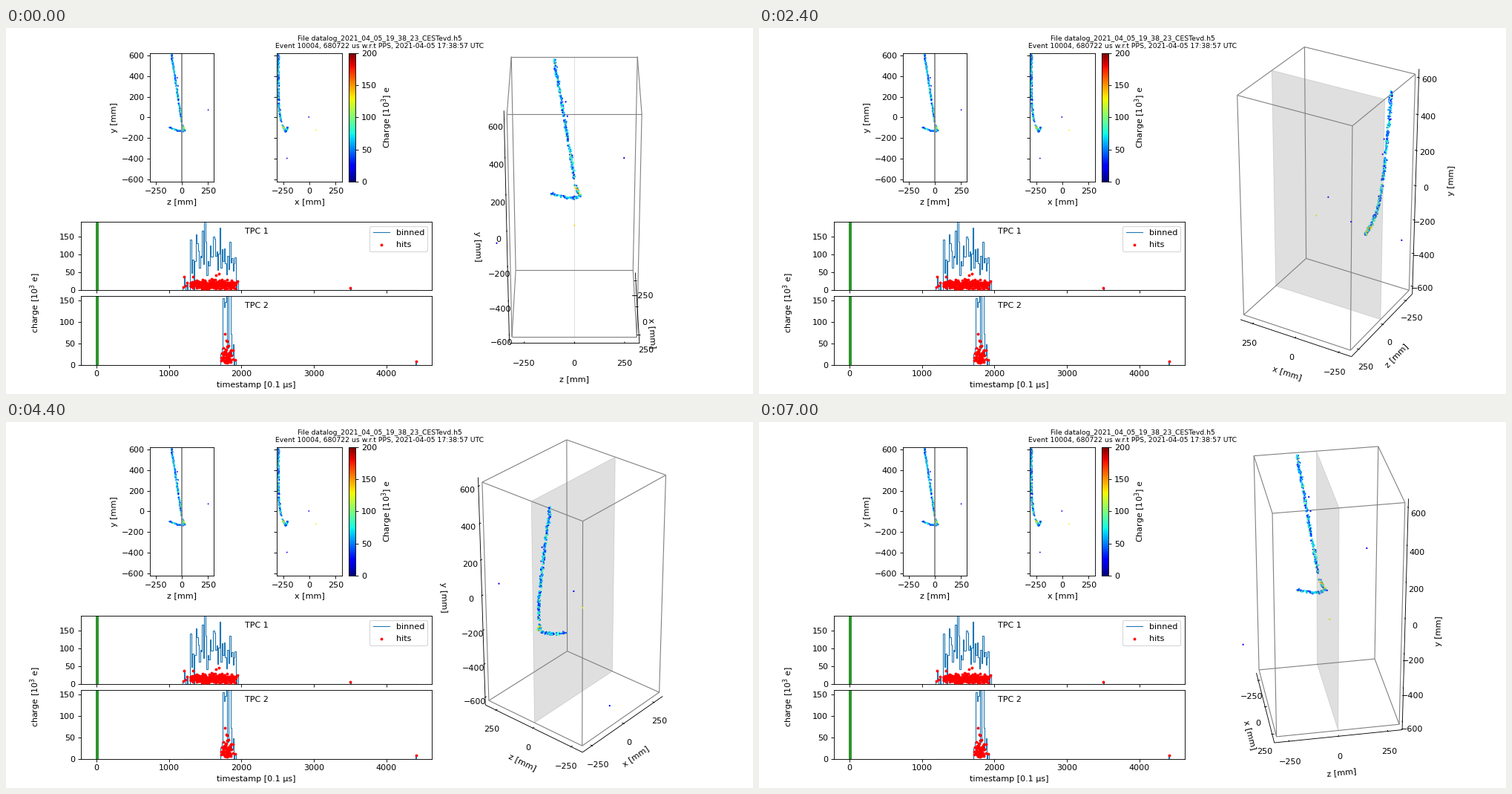
A matplotlib script that plays this animation: 1007 px wide and 493 px high, repeating every 7.2 s.

```python
from itertools import combinations, product

import matplotlib.pyplot as plt
import numpy as np
from matplotlib.animation import FuncAnimation
from matplotlib.collections import LineCollection
from matplotlib.patches import Polygon

W, H, DPI = 1007, 493, 80
FRAMES, INTERVAL = 36, 200
plt.rcParams.update({"font.family": "DejaVu Sans", "font.size": 10})

# Detector volume in mm, ordered (x, z, y) with y pointing up
SPAN = np.array([310.38, 310.38, 620.76])
UNIT = 0.3734 / SPAN[0]
CENTER, SCALE, DIST = (766.2, 228.4), 2265, 10
ELEV = np.radians(30)
CMAP = plt.get_cmap("jet")

rng = np.random.default_rng(7)
fig = plt.figure(figsize=(W / DPI, H / DPI), dpi=DPI, facecolor="white")


def pixel_axes(left, top, right, bottom):
    return fig.add_axes([left / W, 1 - bottom / H, (right - left) / W, (bottom - top) / H])


# ---------------------------------------------------------------- event data
def trail(count, start, end, bend=lambda s: (0, 0, 0)):
    """Jittered hits along a bent line between two (x, z, y) points."""
    points = np.array([(1 - s) * np.array(start) + s * np.array(end) + bend(s)
                       for s in rng.uniform(0, 1, count)])
    return points + rng.normal(0, 3.5, points.shape)


def charges(count, width):
    return 20 + width * rng.beta(1.4, 1.8, count)


track = trail(310, (-294, -99, 616), (-294, 0, -46), lambda s: (28 * s**6, 0, 0))
kink = trail(40, (-260, 3, -72), (-232, 29, -126))
branch = trail(75, (-232, 29, -124), (-207, -117, -97),
               lambda s: (0, 0, -15 * np.sin(np.pi * s**0.7)))
strays = [(-275, 252, 73), (-5, 0, 4), (-213, -402, -395),
          (64, 0, -122), (-288, -43, 384), (-286, -35, 305)]
hits = np.vstack([track, kink, branch, strays])
charge = np.concatenate([charges(len(track), 90), charges(len(kink), 160),
                         charges(len(branch), 90), [20, 25, 22, 132, 20, 22]])
colors = CMAP(charge / 200)

# ---------------------------------------------------------------- projections
fig.suptitle("File datalog_2021_04_05_19_38_23_CESTevd.h5\n"
             "Event 10004, 680722 us w.r.t PPS, 2021-04-05 17:38:57 UTC", fontsize="small")

ax_zy = pixel_axes(194, 34, 280, 207)
ax_xy = pixel_axes(365, 34, 453, 207)
for ax, column, limit, name in ((ax_zy, 1, 304.3, "z"), (ax_xy, 0, 310.4, "x")):
    ax.scatter(hits[:, column], hits[:, 2], s=2.6, c=colors, lw=0)
    ax.set(xlim=(-limit, limit), ylim=(-SPAN[2], SPAN[2]), xticks=(-250, 0, 250),
           yticks=range(-600, 601, 200), xlabel=f"{name} [mm]")
ax_zy.axvline(0, color="gray", lw=1.5)
ax_zy.set_ylabel("y [mm]")
ax_xy.tick_params(labelleft=False)

ax_bar = pixel_axes(462, 34, 471, 207)
ax_bar.imshow(np.linspace(0, 1, 256)[:, None], cmap=CMAP, origin="lower",
              aspect="auto", extent=(0, 1, 0, 200))
ax_bar.set(xticks=[], yticks=range(0, 201, 50))
ax_bar.yaxis.tick_right()
ax_bar.yaxis.set_label_position("right")
ax_bar.set_ylabel("Charge [$10^3$] e")

# ---------------------------------------------------------------- waveforms
pulses1 = np.column_stack([1295 + 650 * rng.beta(1.15, 1.15, 260),
                           rng.normal(16, 6, 260).clip(4, 31)])
outliers1 = [(1205, 37), (1200, 9), (1230, 13), (1250, 21), (1330, 38), (1648, 42), (1690, 46), (3500, 6)]
pulses2 = np.column_stack([rng.normal(1805, 42, 60).clip(1722, 1890),
                           4 + 40 * rng.beta(1.1, 1.8, 60)])
outliers2 = [(1770, 72), (1795, 57), (1800, 54), (1915, 12), (4410, 8)]

ax_t1 = pixel_axes(101, 261, 574, 353)
ax_t2 = pixel_axes(101, 361, 574, 453.7)
for ax, title, top, pulses in ((ax_t1, "TPC 1", 193, np.vstack([pulses1, outliers1])),
                               (ax_t2, "TPC 2", 159.5, np.vstack([pulses2, outliers2]))):
    time, size = pulses.T
    binned, edges = np.histogram(time, np.arange(1190, 4450, 15), weights=size)
    steps = ax.stairs(binned, edges, color="C0", lw=1)
    dots = ax.scatter(time, size, s=12, c="red", lw=0, zorder=3)
    ax.axvspan(-12, 30, color="#2e942e", lw=0)
    ax.set(xlim=(-213, 4628), ylim=(0, top), xticks=range(0, 4001, 1000), yticks=range(0, 151, 50))
    ax.text(0.5, 0.86, title, transform=ax.transAxes, ha="center", va="center")
    if ax is ax_t1:
        ax.legend([steps, dots], ["binned", "hits"], loc="upper right")
ax_t1.tick_params(labelbottom=False)
ax_t2.set_xlabel("timestamp [0.1 \u03bcs]")
fig.text(39.5 / W, 1 - 370 / H, "charge [$10^3$ e]", rotation=90, ha="center", va="center")

# ---------------------------------------------------------------- 3D view
view = fig.add_axes([0, 0, 1, 1])
view.set(xlim=(0, W), ylim=(H, 0))
view.axis("off")

CORNERS = np.array(list(product((-1, 1), repeat=3))) * SPAN
EDGES = [pair for pair in combinations(range(8), 2)
         if np.count_nonzero(CORNERS[pair[0]] != CORNERS[pair[1]]) == 1]
CATHODE = np.array([(-1, 0, -1), (1, 0, -1), (1, 0, 1), (-1, 0, 1)]) * SPAN

# (axis index, tick direction, side that flips to the near edge, name, ticks, name gap)
AXES = ((0, 1, 1, "x", range(-250, 251, 250), 1.59),
        (1, 0, 0, "z", range(-250, 251, 250), 1.59),
        (2, 0, 0, "y", range(-600, 601, 200), 2.6))
OFFSET = SPAN / 6
TICK_GAP = 0.73

box = view.add_collection(LineCollection([], colors="gray", lw=1))
axis_lines = view.add_collection(LineCollection([], colors="black", lw=0.8))
cathode = view.add_patch(Polygon(np.zeros((4, 2)), facecolor=(0.5, 0.5, 0.5, 0.25),
                                 edgecolor=(0.5, 0.5, 0.5, 0.25), lw=0.8, zorder=4))
cloud = view.scatter(np.zeros(len(hits)), np.zeros(len(hits)), s=4, lw=0)
tick_texts = [[view.text(0, 0, str(v).replace("-", "\u2212"), ha="center", va="top")
               for v in axis[4]] for axis in AXES]
name_texts = [view.text(0, 0, f"{axis[3]} [mm]", ha="center", va="center",
                        rotation_mode="anchor") for axis in AXES]


def project(points, azim):
    """Screen positions and distances to the camera."""
    x, z, y = np.moveaxis(np.asarray(points, float) * UNIT, -1, 0)
    toward = x * np.cos(azim) + z * np.sin(azim)
    right = z * np.cos(azim) - x * np.sin(azim)
    up = y * np.cos(ELEV) - toward * np.sin(ELEV)
    depth = DIST - toward * np.cos(ELEV) - y * np.sin(ELEV)
    screen = np.stack([CENTER[0] + SCALE * right / depth, CENTER[1] - SCALE * up / depth], -1)
    return screen, depth


def pushed_out(point, index, gap):
    moved = point + np.sign(point) * gap * OFFSET
    moved[index] = point[index]
    return moved


def draw_axes(azim):
    direction = np.array([np.cos(azim), np.sin(azim), np.tan(ELEV)])
    far = np.where(direction < -1e-9, 1, -1)
    segments = []
    for (index, tickdir, flip, _, ticks, gap), texts, name in zip(AXES, tick_texts, name_texts):
        start = far * SPAN * (1 + 1 / 24)
        start[flip] *= -1
        end = start.copy()
        end[index] *= -1
        line, _ = project([start, end], azim)
        segments.append(line)

        middle = (start + end) / 2
        name.set_position(project(pushed_out(middle, index, gap), azim)[0])
        dx, dy = line[1] - line[0]
        angle = np.degrees(np.arctan2(-dy, dx)) % 180
        name.set_rotation(angle - 180 if angle > 90 else angle)

        for value, text in zip(ticks, texts):
            spot = start.copy()
            spot[index] = value
            mark = np.array([spot, spot])
            mark[:, tickdir] += np.array([0.2, -0.1]) * far[tickdir] * OFFSET[tickdir]
            segments.append(project(mark, azim)[0])
            text.set_position(project(pushed_out(spot, index, TICK_GAP), azim)[0])
    axis_lines.set_segments(segments)


def update(frame):
    azim = np.radians(frame * 360 / FRAMES)
    draw_axes(azim)
    corners, _ = project(CORNERS, azim)
    box.set_segments([corners[list(edge)] for edge in EDGES])

    outline, plane_depth = project(CATHODE, azim)
    cathode.set_xy(outline)

    # Far hits are painted first; the whole cloud goes over or under the cathode
    screen, depth = project(hits, azim)
    order = np.argsort(-depth)
    cloud.set_offsets(screen[order])
    cloud.set_facecolors(colors[order])
    cloud.set_zorder(5 if depth.min() < plane_depth.min() else 3)
    return box, axis_lines, cathode, cloud


anim = FuncAnimation(fig, update, frames=FRAMES, interval=INTERVAL, repeat=True, repeat_delay=0)
plt.show()
```
